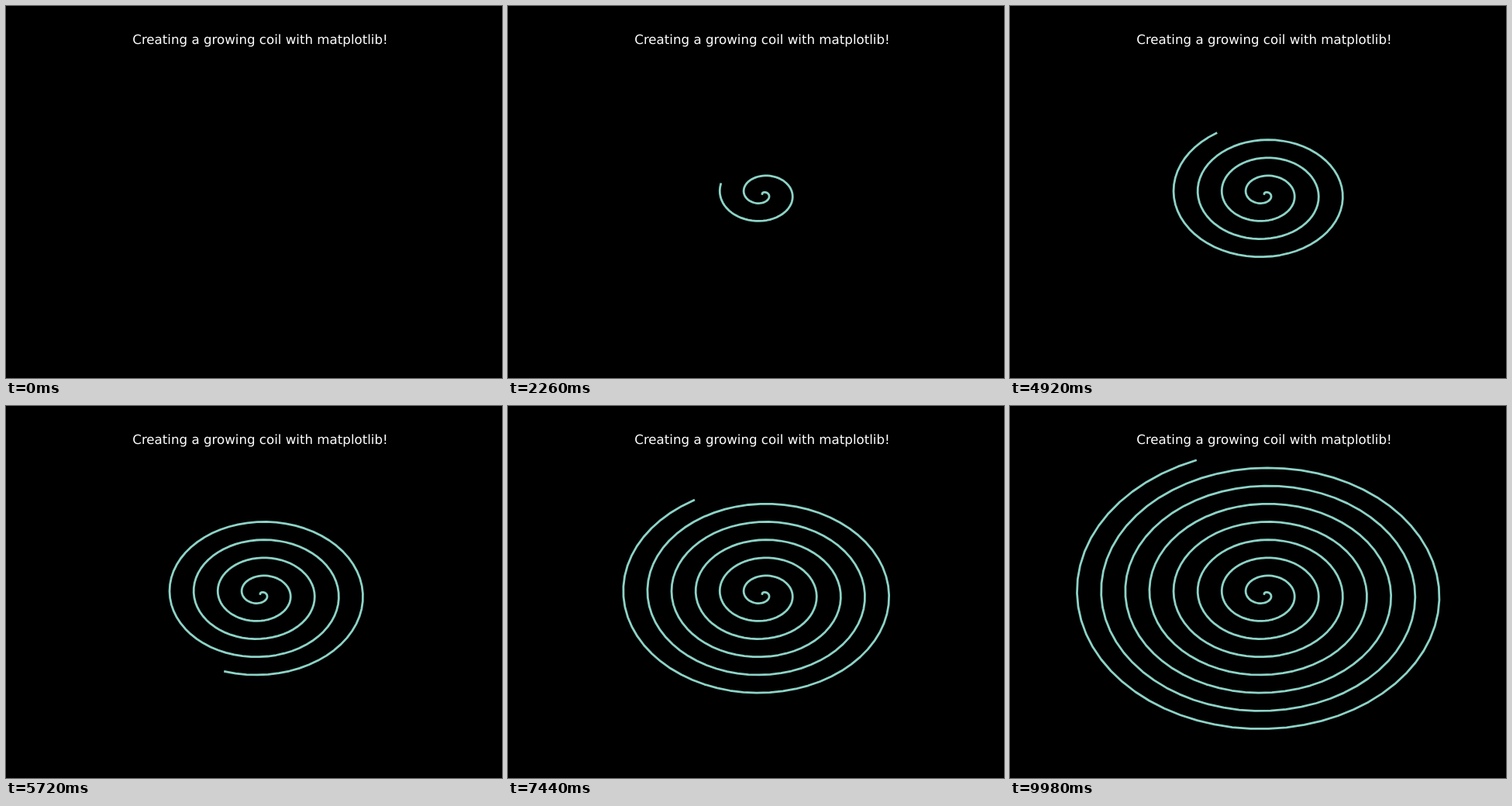
Write an HTML page that moves like this. It is 640 px wide and 480 px high and loops after 10 s.

```html
<!DOCTYPE html>
<html lang="en">
<head>
<meta charset="utf-8">
<title>Growing coil</title>
<style>
  html, body { margin: 0; height: 100%; overflow: hidden; background: #000; }
  svg { display: block; }
  text { font: 16.667px "DejaVu Sans", sans-serif; fill: #fff; text-anchor: middle; text-rendering: geometricPrecision; }
  polyline { fill: none; stroke: #8dd3c7; stroke-width: 2.778; stroke-linecap: square; stroke-linejoin: round; }
</style>
</head>
<body>
<svg width="640" height="480" viewBox="0 0 640 480">
  <text x="328" y="49">Creating a growing coil with matplotlib!</text>
  <polyline id="coil"/>
</svg>
<script>
  const STEPS = 500, STEP_MS = 20;
  const CENTER_X = 328, CENTER_Y = 242.4, SCALE_X = 4.96, SCALE_Y = 3.696;
  const coil = document.getElementById("coil");

  const points = Array.from({ length: STEPS }, (_, i) => {
    const a = i / 10;
    const x = CENTER_X + SCALE_X * a * Math.sin(a);
    const y = CENTER_Y - SCALE_Y * a * Math.cos(a);
    return x.toFixed(3) + "," + y.toFixed(3);
  });

  function draw() {
    const step = Math.floor(performance.now() / STEP_MS) % STEPS;
    coil.setAttribute("points", step ? points.slice(0, step + 1).join(" ") : "");
    requestAnimationFrame(draw);
  }
  draw();
</script>
</body>
</html>
```
